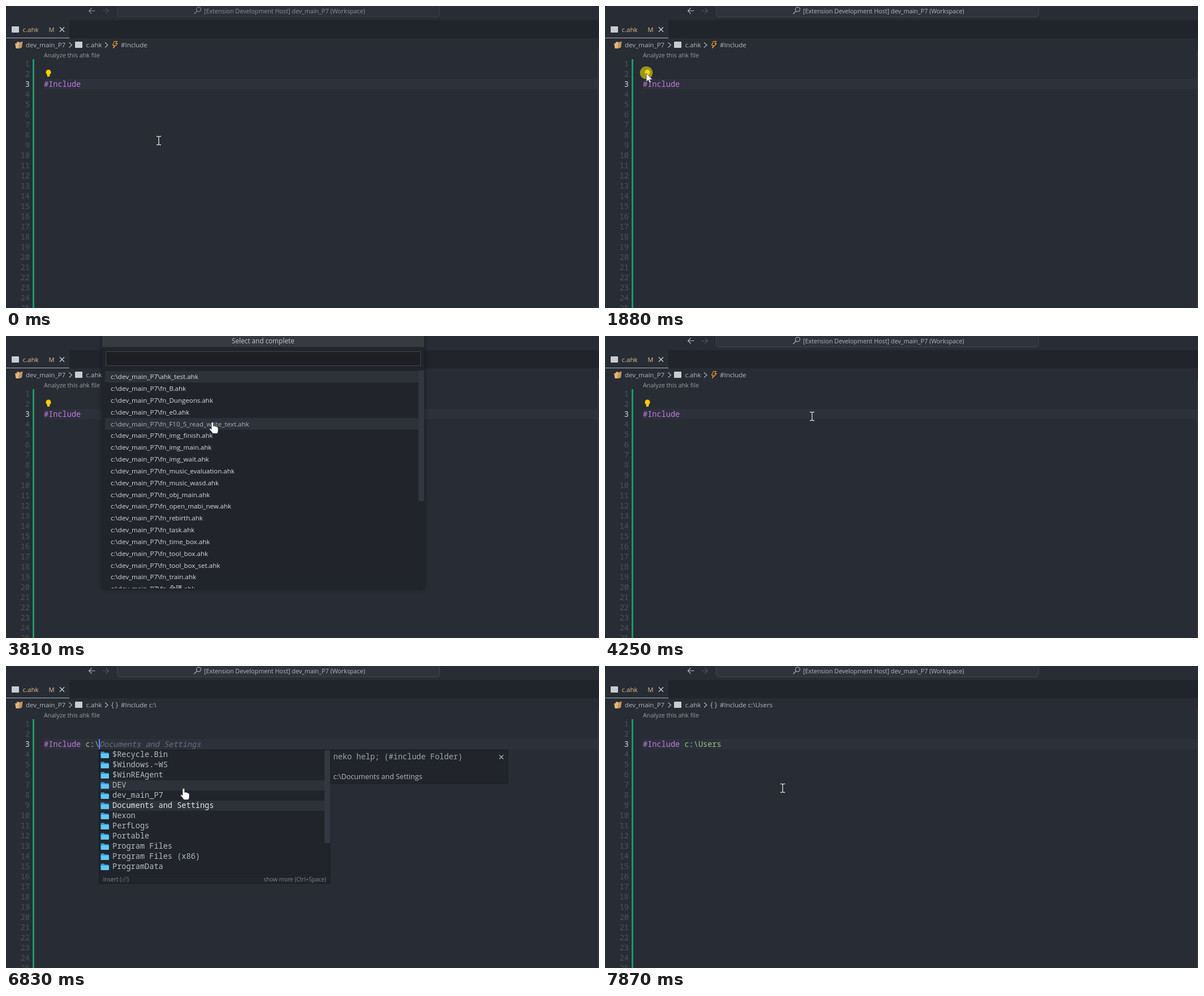
An HTML page that plays this animation: 1048 px wide and 534 px high, repeating every 7990 ms.

```html
<!DOCTYPE html>
<html lang="en">
<head>
<meta charset="utf-8">
<title>Include completion</title>
<style>
  html, body { margin: 0; width: 100%; height: 100%; overflow: hidden; background: #282c34; }
  svg { display: block; width: 1048px; height: 534px; }
  text { font: 11.55px "Open Sans", "Noto Sans", "Noto Sans CJK TC", "Noto Sans CJK SC", sans-serif; fill: #b4b8bf; white-space: pre; }
  .mono { font: 13.6px "Noto Sans Mono", "DejaVu Sans Mono", monospace; }
  .line { fill: none; stroke: #b4b8bf; stroke-width: 1.1; }
  .num { text-anchor: end; fill: #495162; }
  .num.on { fill: #d0d3d9; }
  .git { fill: #e2c08d; }
  .dim { fill: #7f848e; font-size: 10px; }
  .title { font-size: 10.75px; }
  .box { fill: #21252b; stroke: #181a1f; }
  .sel { fill: #2c313a; }
  .thumb { fill: #323741; }
</style>
</head>
<body>
<svg viewBox="0 0 1048 534">
  <defs>
    <clipPath id="pickClip"><rect x="170" y="61" width="569" height="385"/></clipPath>
    <clipPath id="listClip"><rect x="165" y="149" width="408" height="216"/></clipPath>
    <g id="folder">
      <path d="M0 1.500Q0 .5 1 .5H5.500L7 2.200H13Q14 2.200 14 3.200V5H0Z" fill="#2f9fe0"/>
      <path d="M0 4H14.500V11Q14.500 12 13.500 12H1Q0 12 0 11Z" fill="#5fc8f8"/>
    </g>
    <path id="chevron" class="line" d="M0 0L5 4.500L0 9"/>
  </defs>

  <!-- title bar and tabs -->
  <rect width="1048" height="534" fill="#282c34"/>
  <g id="bar">
    <path class="line" d="M157.500 8.500H146.500M151.500 3.500L146.500 8.500L151.500 13.500"/>
    <path class="line" opacity=".3" d="M170.500 8.500H181.500M176.500 3.500L181.500 8.500L176.500 13.500"/>
    <rect x="196.500" y="-8.500" width="570" height="28" rx="5" fill="#2f333b" stroke="#40444c"/>
    <circle class="line" cx="340.500" cy="6" r="4"/>
    <path class="line" d="M337.500 9L332.500 14"/>
    <text class="title" x="350" y="13">[Extension Development Host] dev_main_P7 (Workspace)</text>
  </g>
  <rect y="25" width="1048" height="32" fill="#21252b"/>
  <rect y="25" width="112" height="32" fill="#282c34"/>
  <rect y="56" width="112" height="1" fill="#aeb2b9"/>
  <rect x="10" y="36" width="13" height="11" rx="1" fill="#c9ccd0"/>
  <g id="tab">
    <text class="git" x="29.500" y="46">c.ahk</text>
    <text class="git" x="75.500" y="46" style="font-size:11px">M</text>
  </g>
  <path class="line" style="stroke:#d7dae0" d="M95 37.500L103 45.500M103 37.500L95 45.500"/>

  <!-- breadcrumb -->
  <path d="M16 66H19V63.500H23L24.500 65L22.500 75H17.500Z" fill="#e0b57a"/>
  <path d="M24.500 64L29.500 62.500L28 73.500L22.500 75.500Z" fill="#c4975c"/>
  <text x="35" y="73">dev_main_P7</text>
  <use href="#chevron" x="111.500" y="64.500"/>
  <rect x="122" y="63" width="13" height="11" rx="1" fill="#c9ccd0"/>
  <text x="141.500" y="73">c.ahk</text>
  <use href="#chevron" x="175" y="64.500"/>
  <path id="bolt" class="line" style="stroke:#ee9d28" d="M191.500 62.500H196.500L194 66.500H197L189.500 74.500L191.500 69.500H188.500Z"/>
  <text id="braces" x="186" y="72.500" style="font-size:12px">{ }</text>
  <text id="crumb" x="203" y="73"></text>

  <!-- editor -->
  <rect x="67" y="129" width="981" height="18" fill="#2c313c"/>
  <text x="67" y="91" style="font-size:10.800px;fill:#999b9f">Analyze this ahk file</text>
  <g id="numbers"></g>
  <rect x="47" y="94" width="3" height="440" fill="#169b6b"/>
  <rect x="1046" y="78" width="2" height="456" fill="#383a3e"/>
  <path id="bulb" fill="#ffcc00" d="M75 112.500A4.600 4.600 0 0 1 78 120.500L77.200 122.500V124Q77.200 125 76 125H74Q72.800 125 72.800 124V122.500L72 120.500A4.600 4.600 0 0 1 75 112.500Z"/>
  <text class="mono" x="67" y="142.500" style="fill:#c678dd">#Include</text>
  <text id="typed" class="mono" y="142.500" style="fill:#98c379"></text>
  <text id="ghost" class="mono" y="142.500" style="fill:#6b717d;font-style:italic"></text>
  <rect id="caret" y="129" width="2" height="18" fill="#528bff"/>

  <!-- suggestions -->
  <g id="suggest">
    <rect class="box" x="164.500" y="148.500" width="408" height="236"/>
    <rect class="box" x="573.500" y="148.500" width="313" height="59"/>
    <g clip-path="url(#listClip)"><g id="list">
      <rect id="hoverRow" class="sel" x="165" width="398" height="18"/>
      <rect id="selRow" class="sel" x="165" width="398" height="18"/>
    </g></g>
    <rect id="listThumb" class="thumb" x="563" y="149" width="10" height="164"/>
    <rect x="165" y="366" width="407" height="1" fill="#1b1e23"/>
    <text class="dim" x="171.500" y="380.500">Insert (⏎)</text>
    <text class="dim" x="455.500" y="380.500">show more (Ctrl+Space)</text>
    <text class="mono" x="578.500" y="165" style="fill:#9da3ae">neko help; (#include Folder)</text>
    <path class="line" d="M872 157.500L879 164.500M879 157.500L872 164.500"/>
    <text id="doc" x="578.500" y="199.500" style="font-size:12.600px"></text>
  </g>

  <!-- quick pick -->
  <g id="pick">
    <rect x="170" y="-6" width="569" height="453" rx="4" fill="#21252b" style="filter:drop-shadow(0 0 4px #0007)"/>
    <rect x="170" width="569" height="19.500" fill="#373a3f"/>
    <text x="399" y="13" style="font-size:11.750px;fill:#c4c7cc">Select and complete</text>
    <rect x="176.500" y="27.500" width="556" height="25" fill="#1d1f23" stroke="#3e4452"/>
    <rect id="pickCaret" x="179" y="33" width="1" height="15" fill="#d7dae0"/>
    <g id="pickRows" clip-path="url(#pickClip)">
      <rect class="sel" x="175" y="62" width="554" height="20"/>
      <rect id="pickHover" class="sel" x="175" width="554" height="20.800"/>
    </g>
    <rect id="pickThumb" class="thumb" x="729" y="61" width="10" height="231"/>
  </g>

  <!-- pointer -->
  <g id="pointer">
    <circle id="click" r="11.300" cy="-1" fill="#f0e600" opacity=".58"/>
    <g id="beam" fill="none">
      <path id="beamShape" d="M-4 -7.500H-1.500L0 -6.500L1.500 -7.500H4M0 -6.500V6.500M-4 7.500H-1.500L0 6.500L1.500 7.500H4"/>
    </g>
    <path id="arrow" d="M0 0V15L3.500 11.800L6 17L8.300 16L6 11H11Z" fill="#fff" stroke="#22252a" stroke-width=".7"/>
    <path id="hand" d="M-2 1.500Q0 -1 1.700 1.500V7.500Q3.500 6 5 8Q6.500 7 7.800 9Q10 8.500 10 11V15Q10 18 8.300 20.500H.5Q-2 17 -5 13.500Q-6 11 -3.800 11.300L-2 13Z" fill="#fff" stroke="#22252a" stroke-width=".7"/>
  </g>
</svg>
<script>
const LOOP = 7990, ADV = 8.16, LEFT = 67, ROW = 18, PICK_ROW = 20.83;
const $ = id => document.getElementById(id);
const show = (id, on) => { $(id).style.display = on ? '' : 'none'; };
const set = (id, attrs) => { for (const k in attrs) $(id).setAttribute(k, attrs[k]); };
const within = (t, ranges) => ranges.some(([a, b]) => t >= a && t < b);

function add(parent, tag, attrs, text = '') {
  const el = document.createElementNS('http://www.w3.org/2000/svg', tag);
  for (const k in attrs) el.setAttribute(k, attrs[k]);
  el.textContent = text;
  return $(parent).appendChild(el);
}

const folders = ['$Recycle.Bin', '$Windows.~WS', '$WinREAgent', 'DEV', 'dev_main_P7',
  'Documents and Settings', 'Nexon', 'PerfLogs', 'Portable', 'Program Files',
  'Program Files (x86)', 'ProgramData', 'Recovery', 'Sandbox', 'Users', 'Windows'];
const files = ['ahk_test', 'fn_B', 'fn_Dungeons', 'fn_e0', 'fn_F10_5_read_write_text',
  'fn_img_finish', 'fn_img_main', 'fn_img_wait', 'fn_music_evaluation', 'fn_music_wasd',
  'fn_obj_main', 'fn_open_mabi_new', 'fn_rebirth', 'fn_task', 'fn_time_box', 'fn_tool_box',
  'fn_tool_box_set', 'fn_train', 'fn_全碼'];

for (let n = 1; n <= 25; n++)
  add('numbers', 'text', { class: n === 3 ? 'mono num on' : 'mono num', x: 42, y: 88.6 + n * ROW }, n);

const folderRows = folders.map((name, i) => {
  add('list', 'use', { href: '#folder', x: 167.5, y: 151 + i * ROW });
  return add('list', 'text', { class: 'mono', x: 188, y: 161.3 + i * ROW }, name);
});
const fileRows = files.map((name, i) =>
  add('pickRows', 'text', { x: 185, y: 76.3 + i * PICK_ROW }, `c:\\dev_main_P7\\${name}.ahk`));

// dark rim under a light stroke
set('beamShape', { stroke: '#16181c', 'stroke-width': 3 });
add('beam', 'path', { d: $('beamShape').getAttribute('d'), stroke: '#e6e6e6', 'stroke-width': 1.4 });

// time, x, y of the pointer's hot spot
const path = [[40, 270, 238], [800, 218, 158], [1600, 108, 128], [1800, 73, 119], [2000, 73, 119],
  [2400, 179, 181], [2810, 179, 181], [3050, 356, 160], [3500, 365, 152], [4050, 365, 152],
  [4250, 366, 142], [4400, 366, 142], [4770, 297, 157], [4930, 291, 156], [5700, 291, 156],
  [6300, 314, 216]];

// latest value whose start time has passed
const step = (steps, t) => steps.reduce((v, [at, val]) => t >= at ? val : v, steps[0][1]);

function glide(t) {
  const i = path.findIndex(p => p[0] > t);
  if (i < 1) return path[i < 0 ? path.length - 1 : 0].slice(1);
  const [a, b] = [path[i - 1], path[i]];
  const u = (t - a[0]) / (b[0] - a[0]), e = u * u * (3 - 2 * u);
  return [1, 2].map(k => a[k] + (b[k] - a[k]) * e);
}

const typing = [[0, ''], [5140, 'c'], [5460, 'c:'], [5620, 'c:\\'], [7350, 'c:\\Users']];
const crumbs = [[0, ''], [5300, ' c'], [5900, ' c:\\'], [7700, ' c:\\Users']];
const kinds = [[0, 'beam'], [1700, 'arrow'], [2500, 'hand'], [4050, 'beam'], [5640, 'hand'], [7350, 'beam']];
const carets = [[380, 880], [1380, 1870], [4300, 4800], [5140, 6260], [6510, 7850]];

// column of the caret, sliding to each new place
function caretColumn(t) {
  const moves = [[5150, 9, 10], [5470, 10, 11], [5670, 11, 12], [7360, 12, 17]];
  return moves.reduce((c, [at, from, to]) =>
    t < at ? c : from + (to - from) * (1 - (1 - Math.min(1, (t - at) / 80)) ** 2), 9);
}

function drawSuggest(t, y) {
  const open = t >= 5780 && t < 7350;
  show('suggest', open);
  show('ghost', open);
  if (!open) return;
  const sel = Math.max(0, Math.min(14, Math.floor((t - 6516) / 54)));
  const scroll = Math.max(0, sel - 11) * ROW;
  const hover = Math.floor((y + scroll - 148) / ROW);
  set('list', { transform: `translate(0 ${-scroll})` });
  set('selRow', { y: 148 + sel * ROW });
  set('hoverRow', { y: 148 + hover * ROW });
  set('listThumb', { y: 149 + scroll * .72 });
  folderRows.forEach((el, i) => { el.style.fill = i === sel ? '#e4e6ea' : '#b4b9c2'; });
  $('doc').textContent = 'c:\\' + folders[sel];
  $('ghost').textContent = folders[sel];
}

function drawPick(t, y) {
  const open = t >= 2480 && t < 4050;
  show('pick', open);
  show('bar', !open);
  if (!open) return;
  const hover = Math.floor((y - 61.5) / PICK_ROW);
  set('pickHover', { y: 61.6 + hover * PICK_ROW });
  fileRows.forEach((el, i) => { el.style.fill = i === hover ? '#abb2bf' : '#d7dae0'; });
  show('pickCaret', (t - 2310) % 1000 < 500);
  set('pickThumb', { opacity: Math.max(0, Math.min(1, (t - 2810) / 300)) });
}

function draw(t) {
  const [x, y] = glide(t), kind = step(kinds, t), typed = step(typing, t);
  const away = within(t, [[0, 380], [2100, 2480]]);
  set('bar', { opacity: away ? .72 : 1 });
  set('tab', { opacity: away ? .92 : 1 });
  show('bulb', t < 4850);

  $('typed').textContent = typed;
  $('crumb').textContent = '#Include' + step(crumbs, t);
  show('bolt', t < 5300);
  show('braces', t >= 5300);
  show('caret', within(t, carets));
  set('caret', { x: Math.floor(LEFT + caretColumn(t) * ADV - .5) });

  drawSuggest(t, y);
  drawPick(t, y);

  set('pointer', { transform: `translate(${x} ${y})` });
  for (const k of ['beam', 'arrow', 'hand']) show(k, k === kind);
  show('click', within(t, [[1840, 2000]]));
}

set('typed', { x: LEFT + 9 * ADV });
set('ghost', { x: LEFT + 12 * ADV });
const start = performance.now();
function frame() {
  draw((performance.now() - start) % LOOP);
  requestAnimationFrame(frame);
}
frame();
</script>
</body>
</html>
```
